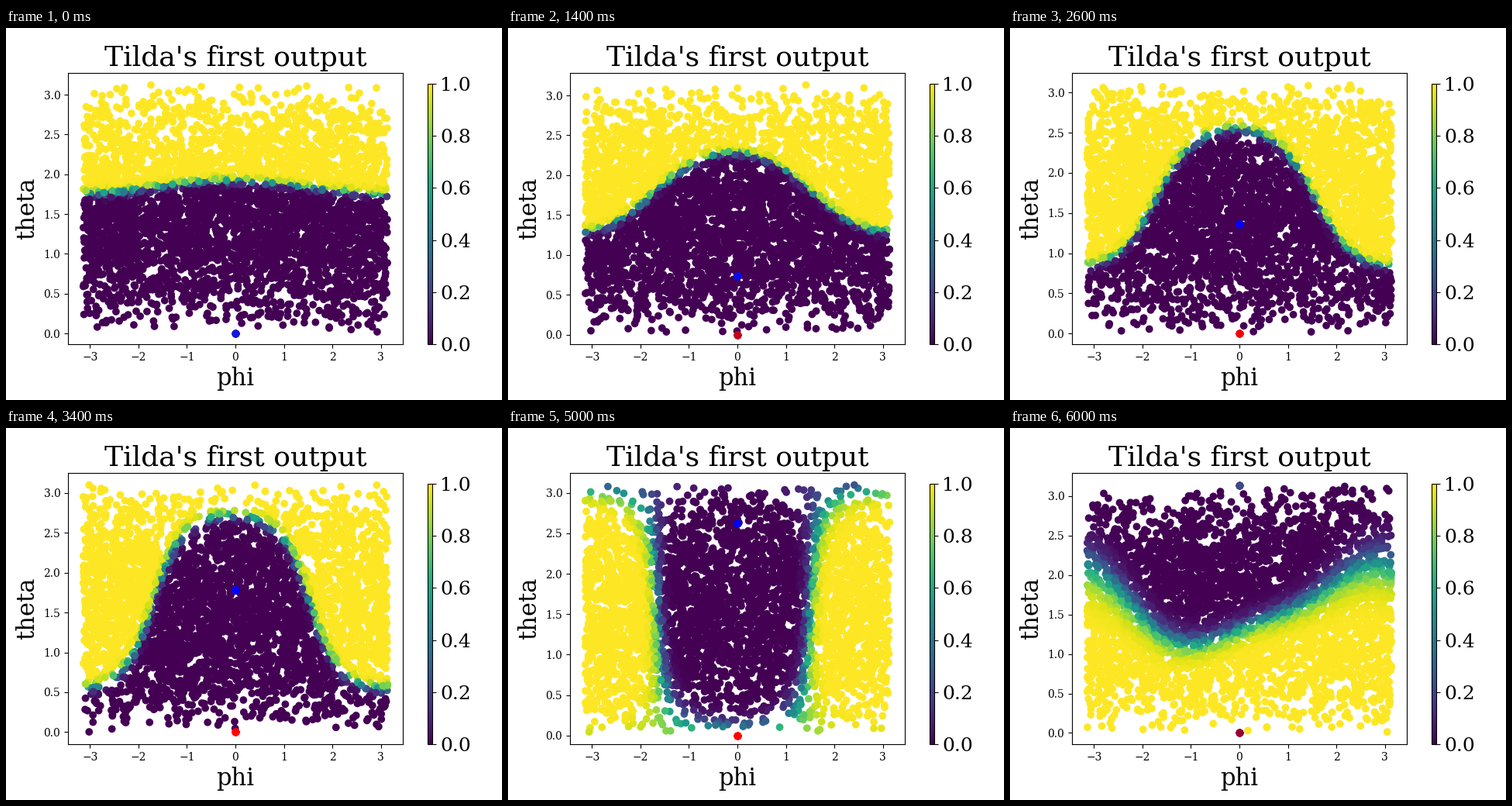
Recreate the animation shown at these times as a matplotlib script. Size 640 px wide and 480 px high, loop 6200 ms.

```python
import numpy as np
import matplotlib.pyplot as plt
from matplotlib.animation import FuncAnimation
from matplotlib.cm import ScalarMappable
from matplotlib.colors import to_rgb

FRAMES, STEP = 31, 200
FLIP = 25  # from here on the output turns upside down
POINTS = 4000
DOT_LAYERS = 12  # overdrawing gives the two dots a crisp rim
RED, CRIMSON = "#ff0000", "#960032"
BLUE, SLATE = "#0000ff", "#3e4989"


def mix(a, b, t):
    return (1 - t) * a + t * b


def blend(a, b, t):
    return mix(np.array(to_rgb(a)), np.array(to_rgb(b)), t)


def sample(k):
    """Uniform points on the sphere as (phi, theta)."""
    rng = np.random.default_rng(100 + k)
    phi = rng.uniform(-np.pi, np.pi, POINTS)
    theta = np.arccos(rng.uniform(-1, 1, POINTS))
    return phi, theta


def plane_logit(t, phi, theta):
    """Signed distance to a plane that tilts over and softens with t."""
    tilt = 0.08 + 1.475 * t + 0.11 * t**8
    offset = 0.13 * (1 + np.cos(np.pi * t))
    sharp = 48 - 30 * t**2
    side = np.sin(tilt) * np.sin(theta) * np.cos(phi + 0.08)
    return -sharp * (side + np.cos(tilt) * np.cos(theta) + offset)


def wave_logit(phi, theta):
    edge = 1.61 + 0.47 * np.cos(phi - 2.59) + 0.11 * np.cos(2 * phi)
    return (11 + 4 * np.cos(phi)) * (edge - theta)


def output(k, phi, theta, flip):
    t = min(k / FLIP, 1)
    z = mix(plane_logit(t, phi, theta), wave_logit(phi, theta), flip)
    return 1 / (1 + np.exp(-z))


plt.rcParams["font.family"] = "DejaVu Serif"
fig = plt.figure(figsize=(6.4, 4.8), dpi=100)
ax = fig.add_axes([0.125, 0.15, 0.675, 0.73])
ax.set_title("Tilda's first output", fontsize=26)
ax.set_xlabel("phi", fontsize=22)
ax.set_ylabel("theta", fontsize=22)
ax.set_xlim(-1.1 * np.pi, 1.1 * np.pi)

cloud = ax.scatter([], [], c=[], cmap="viridis", vmin=0, vmax=1)
base = ax.scatter([0] * DOT_LAYERS, [0] * DOT_LAYERS)
mover = ax.scatter([0] * DOT_LAYERS, [0] * DOT_LAYERS)

cax = fig.add_axes([0.85, 0.15, 0.01, 0.7])
bar = fig.colorbar(ScalarMappable(cmap="viridis"), cax=cax)
bar.ax.tick_params(labelsize=18)


def update(k):
    start = max(1 - k / 15, 0)
    flip = max((k - FLIP) / (FRAMES - 1 - FLIP), 0)

    phi, theta = sample(k)
    cloud.set_offsets(np.column_stack([phi, theta]))
    cloud.set_array(output(k, phi, theta, flip))

    height = np.pi * k / (FRAMES - 1)
    mover.set_offsets([(0, height)] * DOT_LAYERS)
    mover.set_color(blend(BLUE, SLATE, max(0.3 * start, flip)))
    base.set_color(blend(RED, CRIMSON, max(start, flip)))

    lo, hi = theta.min(), max(theta.max(), height)
    pad = 0.05 * (hi - lo)
    ax.set_ylim(lo - pad, hi + pad)
    return cloud, base, mover


anim = FuncAnimation(fig, update, frames=FRAMES, interval=STEP,
                     repeat=True, repeat_delay=0, blit=False)
plt.show()
```
